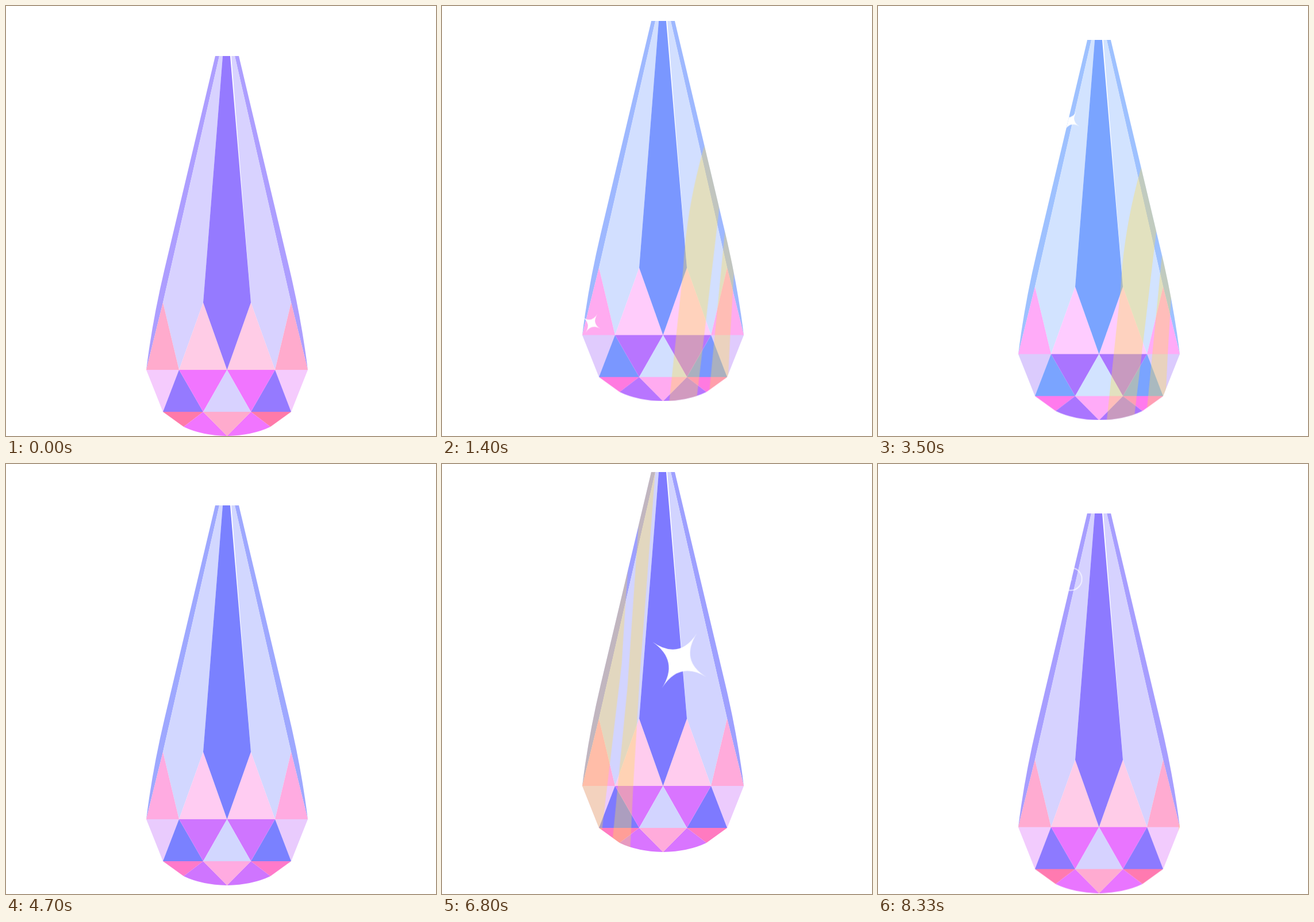
An HTML page that plays this animation: 748 px wide and 748 px high, repeating every 8.41 s.

```html
<!DOCTYPE html>
<html lang="en">
<head>
<meta charset="utf-8">
<title>Crystal drop</title>
<style>
@property --shift { syntax: "<number>"; inherits: true; initial-value: 0; }

html, body { margin: 0; width: 100%; height: 100%; overflow: hidden; background: #fff; }
svg { display: block; width: 100%; height: 100%; --loop: 4205ms; animation: tint var(--loop) linear infinite; }

.deep    { fill: hsl(calc(252 + var(--shift)) 100% 74%); }
.pale    { fill: hsl(calc(248 + var(--shift)) 100% 91.2%); }
.rim     { fill: hsl(calc(249 + var(--shift)) 100% 81%); }
.magenta { fill: hsl(calc(294 + var(--shift)) 100% 73%); }
.lilac   { fill: hsl(calc(290 + var(--shift)) 94% 89.5%); }
.pink    { fill: hsl(calc(336 + var(--shift)) 100% 83.5%); }
.blush   { fill: hsl(calc(330 + var(--shift)) 100% 90%); }
.rose    { fill: hsl(calc(339 + var(--shift)) 100% 74%); }

.bob, .unbob { animation: bob calc(var(--loop) / 2) cubic-bezier(.19, 0, .81, 1) -4180ms infinite alternate; }
.unbob { animation-name: unbob; }
.sheen { fill: rgb(255 222 78 / .36); animation: sheen var(--loop) cubic-bezier(.1, 0, .9, 1) infinite; }
.star { fill: #fff; animation: star var(--loop) ease-in-out var(--delay) infinite; }
.ring { fill: none; stroke: #fff; stroke-width: 1.5; vector-effect: non-scaling-stroke;
        animation: ring var(--loop) linear var(--delay) infinite; }

@keyframes tint {
  0%, 100% { --shift: 0; }
  26.2% { --shift: -33; }
  55.9% { --shift: 0; }
  78.3% { --shift: -40; }
}
@keyframes bob   { from { transform: translateY(87px); }  to { transform: translateY(-1px); } }
@keyframes unbob { from { transform: translateY(-87px); } to { transform: translateY(1px); } }
@keyframes sheen {
  0%, 16.4%, 99.9%, 100% { transform: translateX(120px); }
  58.1% { transform: translateX(-190px); }
}
@keyframes star {
  0%, 75%, 100% { transform: scale(0); }
  87.5% { transform: scale(1); }
  98.2% { transform: scale(.18); }
}
@keyframes ring {
  0%, 93% { transform: scale(0); opacity: 1; }
  98.2% { transform: scale(1); opacity: .9; }
  100% { transform: scale(1.15); opacity: 0; }
}
</style>
</head>
<body>
<svg viewBox="0 0 748 748">
  <defs>
    <clipPath id="outline">
      <path d="M364 0H405L493 370Q514.4 460 525 546L496 619 460 645Q429 660 384.5 661Q340 660 309 645L273 619 244 546Q254.6 460 276 370Z"/>
    </clipPath>
    <g id="side">
      <path class="rim" d="M364 0H371L273 429 244 546Q254.6 460 276 370Z"/>
      <path class="pale" d="M371 0H377L343 429 301 546 273 429Z"/>
      <path class="pink" d="M273 429 301 546H244Z"/>
      <path class="blush" d="M343 429 384.5 546H301Z"/>
      <path class="lilac" d="M244 546H301L273 619Z"/>
      <path class="deep" d="M301 546 343 619H273Z"/>
      <path class="magenta" d="M301 546H384.5L343 619Z"/>
      <path class="rose" d="M273 619H343L309 645Z"/>
      <path class="magenta" d="M343 619 384.5 661Q340 660 309 645Z"/>
    </g>
    <path id="spark" d="M13.4-21Q0 0 20.5 12.5Q0 0-13.4 21Q0 0-20.5-14.3Q0 0 13.4-21Z"/>
  </defs>
  <g class="bob">
    <use href="#side"/>
    <use href="#side" transform="translate(769) scale(-1 1)"/>
    <path class="deep" d="M377 0H392L426 429 384.5 546 343 429Z" id="core"/>
    <path class="pale" d="M384.5 546 426 619H343Z"/>
    <path class="pink" d="M343 619H426L384.5 661Z"/>
    <g clip-path="url(#outline)">
      <g class="sheen">
        <path d="M500 100Q430 270 422 433L397 670H444L484 333Q492 200 500 100Z"/>
        <path d="M520-10 494 373 465 670H498L504 545 516 345 543-10Z"/>
      </g>
      <g class="unbob" id="sparkles"></g>
    </g>
  </g>
</svg>
<script>
// x, y, size, delay in ms
const sparkles = [
  [260, 552, 1, -2102.5],
  [413, 342, 2.3, -1051],
  [335, 200, 1, 0],
];

document.getElementById("core").setAttribute("d", "M377 0H390L426 429 384.5 546 343 429Z");
document.getElementById("sparkles").innerHTML = sparkles.map(([x, y, size, delay]) => `
  <g transform="translate(${x} ${y}) scale(${size})" style="--delay:${delay}ms">
    <use class="star" href="#spark"/>
    <circle class="ring" r="20"/>
  </g>`).join("");
</script>
</body>
</html>
```
